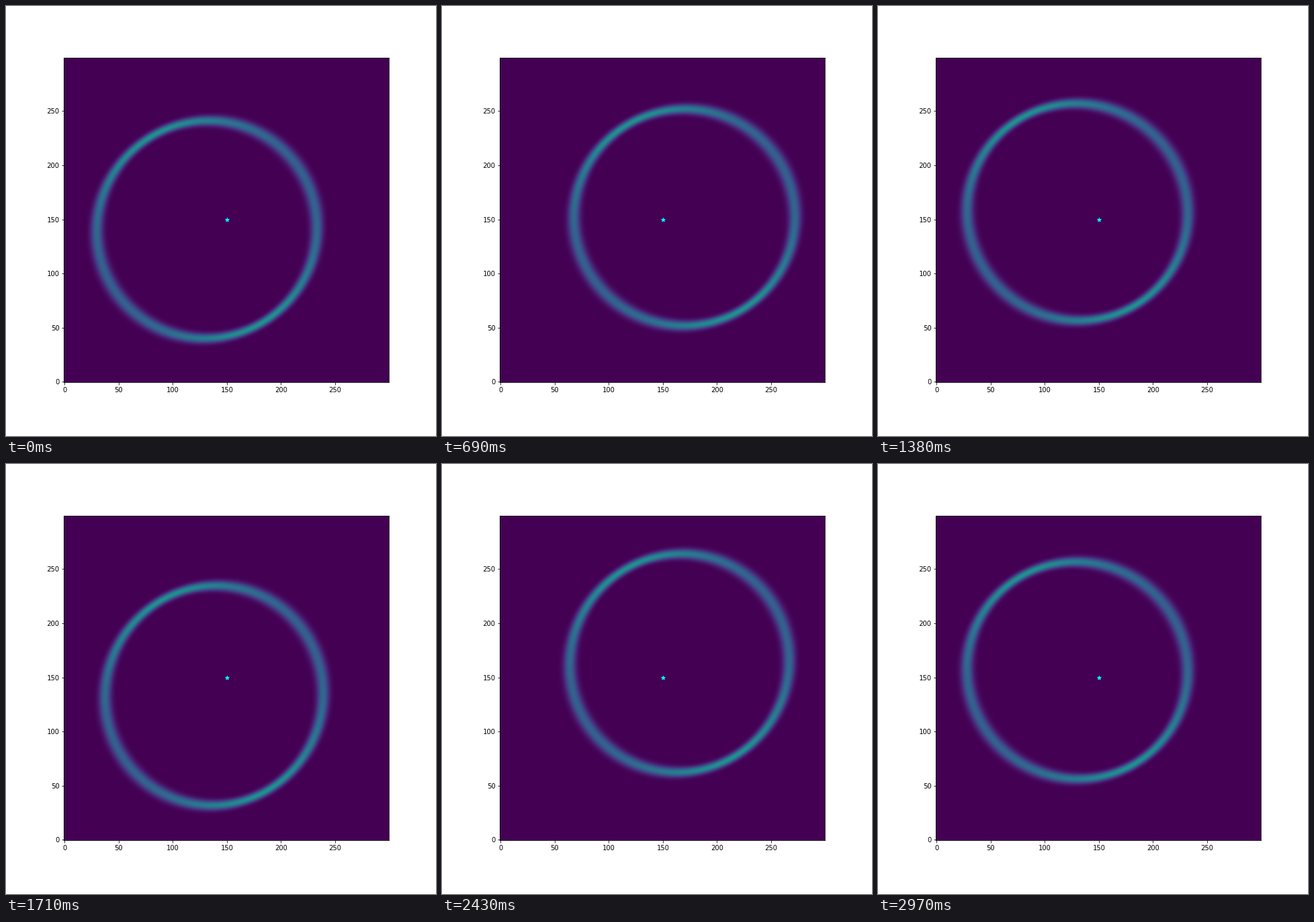
These frames come from a looping animation (648 by 648 pixels, 3 s). A matplotlib script:

```python
import numpy as np
import matplotlib.pyplot as plt
from matplotlib.animation import FuncAnimation

N, FRAMES, STEP = 300, 100, 30
CX, CY = 149.6, 150.0               # star, at one focus of the ring
A, ECC = 102.0, 0.2                 # semi-major axis and eccentricity
START, RATE = 208.0, 6.81           # direction of apocentre, degrees
BEAM_MAJ, BEAM_MIN, BEAM_PA = 4.1, 2.45, np.radians(30)
PEAK = 0.52

Y, X = np.mgrid[:N, :N].astype(float)
B = A * np.sqrt(1 - ECC**2)


def ring(i):
    """Precessing elliptical ring blurred by an elongated beam."""
    t = np.radians(START + RATE * i)
    c, s = np.cos(t), np.sin(t)
    dx, dy = X - CX - A * ECC * c, Y - CY - A * ECC * s
    u, v = dx * c + dy * s, dy * c - dx * s
    rho = np.hypot(u / A, v / B) + 1e-9
    gu, gv = u / A**2 / rho, v / B**2 / rho
    grad = np.hypot(gu, gv) + 1e-9
    dist = (rho - 1) / grad
    phi = np.arctan2(gv, gu) + t - BEAM_PA
    sigma = np.hypot(BEAM_MAJ * np.cos(phi), BEAM_MIN * np.sin(phi))
    return PEAK * BEAM_MIN / sigma * np.exp(-dist**2 / (2 * sigma**2))


fig = plt.figure(figsize=(9, 9), dpi=72)
fig.subplots_adjust(left=0.125, right=0.9, bottom=0.125, top=0.88)
ax = fig.add_subplot()
img = ax.imshow(ring(0), origin="lower", cmap="viridis", vmin=0, vmax=1)
ax.scatter([150], [149.5], marker="*", color="cyan")


def update(i):
    img.set_data(ring(i))
    return [img]


anim = FuncAnimation(fig, update, frames=FRAMES, interval=STEP, repeat=True)
plt.show()
```
